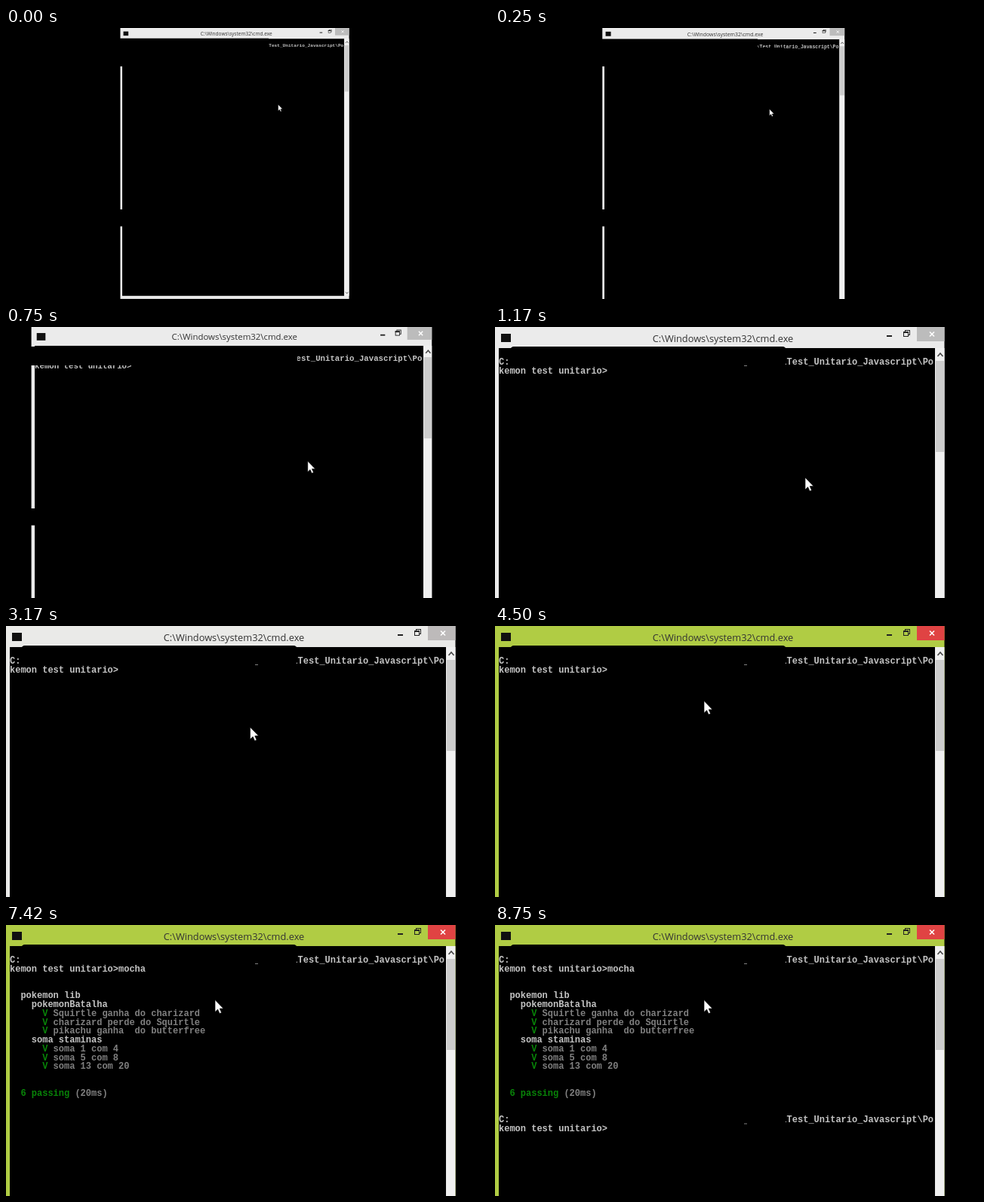
These frames come from a looping animation (640x360 px, 9330 ms). An HTML page with a canvas:

```html
<!DOCTYPE html>
<html lang="pt">
<head>
<meta charset="utf-8">
<title>Terminal</title>
<style>
  html, body { margin: 0; width: 100%; height: 100%; overflow: hidden; background: #000; }
  canvas { display: block; width: 640px; height: 360px; }
</style>
</head>
<body>
<canvas id="stage" width="640" height="360"></canvas>
<script>
const ctx = document.getElementById('stage').getContext('2d');
const LOOP = 9330, FPS = 12;
const MONO = 'bold 12px "Liberation Mono", monospace';
const TITLE = '12.8px "Open Sans", sans-serif';
const CELL = 7.2, LEFT = 5, FIRST_ROW = 46, ROW_STEP = 11.79;
const TEXT = '#c4c4c4', DIM = '#808080', GREEN = '#088408';
const PALE = [235, 235, 235], LIME = [176, 204, 68];
const GREY = [188, 188, 188], RED = [224, 67, 67];

// [row, column, text, colour]
const results = [
  [4, 2, 'pokemon lib', TEXT],
  [5, 4, 'pokemonBatalha', TEXT],
  [6, 8, 'Squirtle ganha do charizard', DIM],
  [7, 8, 'charizard perde do Squirtle', DIM],
  [8, 8, 'pikachu ganha  do butterfree', DIM],
  [9, 4, 'soma staminas', TEXT],
  [10, 8, 'soma 1 com 4', DIM],
  [11, 8, 'soma 5 com 8', DIM],
  [12, 8, 'soma 13 com 20', DIM],
  [15, 2, '6 passing', GREEN],
  [15, 12, '(20ms)', DIM],
];

// Caret: [from ms, to ms, row, column]
const carets = [
  [4000, 4500, 1, 20],
  [5580, 6080, 1, 25],
  [6670, 6830, 1, 25],
  [7170, 7420, 2, 0],
  [8250, 8750, 19, 20],
];

const progress = (t, from, to) => Math.min(1, Math.max(0, (t - from) / (to - from)));
const ease = u => (1 - Math.cos(Math.PI * u)) / 2;
const lerp = (a, b, u) => a + (b - a) * u;
const mix = (a, b, u) => `rgb(${a.map((v, i) => Math.round(lerp(v, b[i], u)))})`;

function rect(x, y, w, h, color) {
  ctx.fillStyle = color;
  ctx.fillRect(x, y, w, h);
}

function line(points, color, width) {
  ctx.beginPath();
  points.forEach(([x, y]) => ctx.lineTo(x, y));
  ctx.strokeStyle = color;
  ctx.lineWidth = width;
  ctx.stroke();
}

function print(row, column, text, color = TEXT) {
  ctx.font = MONO;
  ctx.textAlign = 'left';
  ctx.fillStyle = color;
  ctx.fillText(text, LEFT + column * CELL, FIRST_ROW + row * ROW_STEP + 4);
}

function prompt(row) {
  print(row, 0, 'C:');
  print(row, 52, '\\Test_Unitario_Javascript\\Po');
  print(row + 1, 0, 'kemon test unitario>');
}

function drawFrame(active) {
  const frame = mix(PALE, LIME, active);
  rect(0, 0, 595.5, 707, frame);
  rect(LEFT, 28, 578, 671, '#000');

  rect(8, 9, 13, 11, '#111');
  ctx.font = TITLE;
  ctx.textAlign = 'center';
  ctx.fillStyle = '#333';
  ctx.fillText('C:\\Windows\\system32\\cmd.exe', 302, 19.5);

  rect(519, 11, 7, 2, '#222');
  ctx.strokeStyle = '#222';
  ctx.lineWidth = 1;
  ctx.strokeRect(543.5, 4.5, 6, 6);
  rect(541, 6, 7, 7, frame);
  ctx.strokeRect(541.5, 6.5, 6, 6);
  rect(541, 6, 7, 2, '#222');
  rect(559, 0, 36.5, 19, mix(GREY, RED, active));
  line([[576, 6.5], [582, 12.5]], '#fff', 1.6);
  line([[582, 6.5], [576, 12.5]], '#fff', 1.6);

  rect(583, 28, 12.5, 671, '#f0f0f0');
  rect(584, 45, 11, 121, '#cdcdcd');
  line([[586.5, 39], [590, 35], [593.5, 39]], '#444', 1.6);
  line([[586.5, 689], [590, 693], [593.5, 689]], '#444', 1.6);
}

function drawConsole(t) {
  prompt(0);
  const typed = t < 4825 ? 0 : Math.min(5, 1 + Math.floor((t - 4825) * 6 / 1000));
  print(1, 20, 'mocha'.slice(0, typed));

  if (t >= 7415) {
    results.forEach(entry => print(...entry));
    for (const row of [6, 7, 8, 10, 11, 12]) print(row, 6, 'V', GREEN);
  }
  if (t >= 7495) prompt(18);

  for (const [from, to, row, column] of carets) {
    if (t >= from - 5 && t < to - 5) {
      rect(LEFT + column * CELL, FIRST_ROW + row * ROW_STEP + 3.5, CELL, 2, TEXT);
    }
  }
}

function drawPointer(u) {
  ctx.save();
  ctx.translate(lerp(411, 277, u), lerp(200, 99.5, u));
  ctx.beginPath();
  [[0, 0], [0, 16], [3.6, 12.6], [6, 18], [8.6, 17], [6.2, 11.6], [11, 11.4]]
    .forEach(([x, y]) => ctx.lineTo(x, y));
  ctx.closePath();
  ctx.fillStyle = '#fff';
  ctx.fill();
  ctx.strokeStyle = '#000';
  ctx.lineWidth = 0.6;
  ctx.stroke();
  ctx.restore();
}

// Black covers stay fixed on the stage while the window zooms beneath them.
function drawCovers(t, step, scale) {
  ctx.fillStyle = '#000';
  for (const [y, height] of [[26, 25], [241, 22.5]]) {
    ctx.beginPath();
    ctx.roundRect(20, y, 366, height, 5);
    ctx.fill();
  }
  if (step < 6) rect(0, 27 * scale, 348, 38 - 27 * scale, '#000');
  if (step >= 14) rect(330, 51, 4, 1, DIM);
  if (t >= 7495) rect(330, 263.5, 4, 1, DIM);
}

function draw(t) {
  const step = Math.floor((t + 5) * FPS / 1000);
  const now = step * 1000 / FPS;
  const scale = lerp(0.509, 1, ease(progress(now, 100, 1045)));

  ctx.setTransform(1, 0, 0, 1, 0, 0);
  rect(0, 0, 640, 360, '#000');
  ctx.setTransform(scale, 0, 0, scale, 308.5 * (1 - scale), 0);
  drawFrame(progress(now, 3160, 3500));
  drawConsole(t);
  drawPointer(ease(progress(now, 2917, 3334)));
  ctx.setTransform(1, 0, 0, 1, 0, 0);
  drawCovers(t, step, scale);
}

function tick() {
  draw(performance.now() % LOOP);
  requestAnimationFrame(tick);
}
tick();
</script>
</body>
</html>
```
